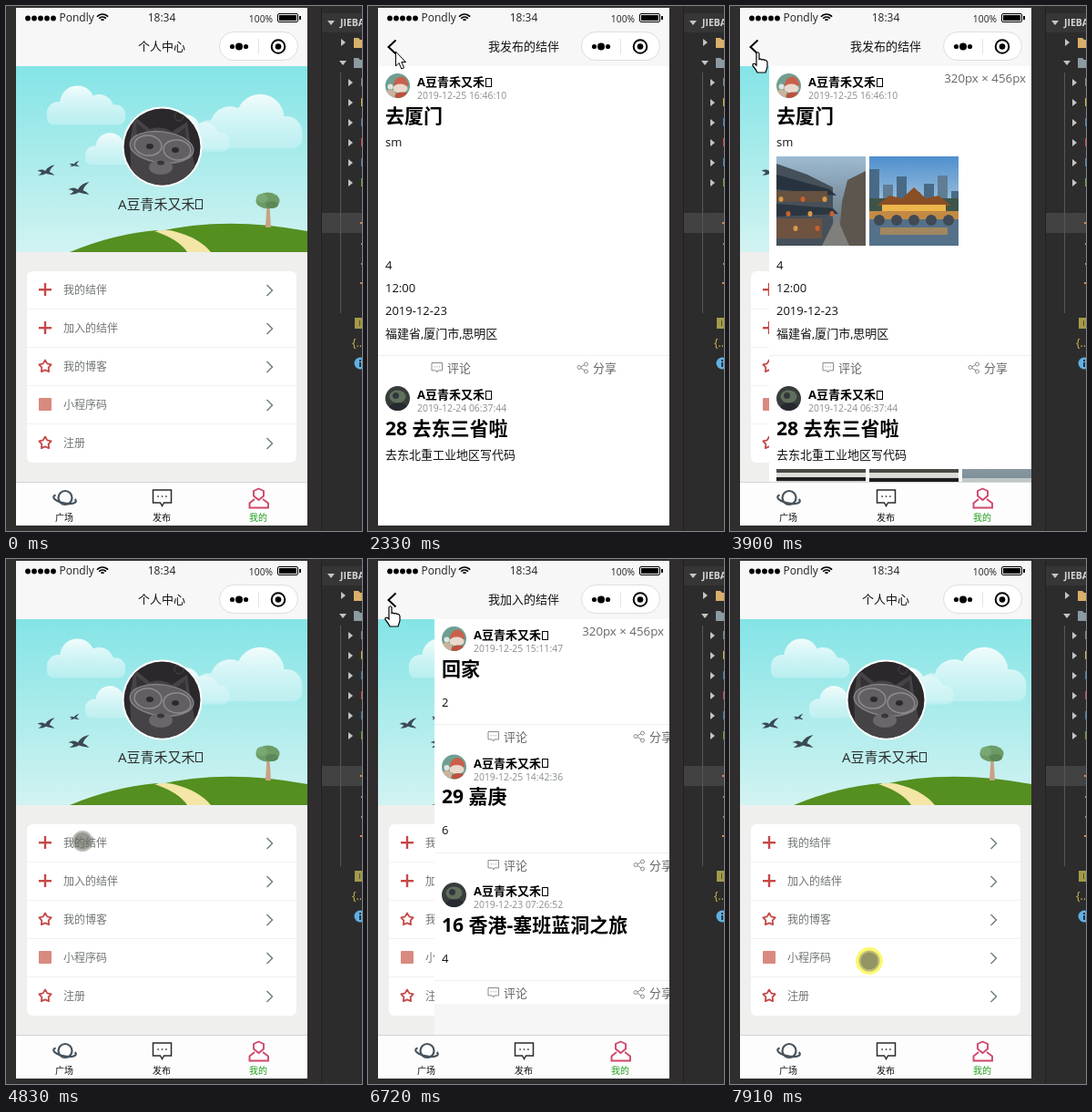
Recreate the animation shown at these times as an HTML page with a canvas. Size 391 px wide and 576 px high, loop 7990 ms.

```html
<!DOCTYPE html>
<html lang="zh">
<head>
<meta charset="utf-8">
<title>个人中心</title>
<style>
html, body { margin: 0; width: 100%; height: 100%; overflow: hidden; background: #2f2d2e; }
canvas { display: block; width: 391px; height: 576px; }
</style>
</head>
<body>
<canvas id="stage"></canvas>
<script>
const W = 391, H = 576, LOOP = 7990, L = 11, SLIDE = 300;
const FONT = '"Open Sans","Noto Sans","Noto Sans CJK SC","Noto Sans CJK",sans-serif';
const RED = '#c64848';
const canvas = document.getElementById('stage');
const c = canvas.getContext('2d');
const dpr = window.devicePixelRatio || 1;
canvas.width = W * dpr;
canvas.height = H * dpr;

// Two visits to a sub page: all times in ms
const VISITS = [
  { title: '我发布的结伴', open: 1400, slideIn: 1476, loaded: 2020, back: 3870, labels: [2330, 4790] },
  { title: '我加入的结伴', open: 5300, slideIn: 5658, loaded: 5950, back: 6675, labels: [6000, 7570] }
];
// Pointer path: time, x, y
const PATH = [
  [70, 311, 535], [710, 130, 321], [1300, 130, 321], [1500, 99, 241], [1930, 42, 86], [2090, 34, 68], [2170, 30, 50],
  [4440, 30, 50], [4910, 95, 362], [5300, 95, 362], [5790, 48, 98], [6010, 30, 67], [6159, 30, 67], [6160, 24, 51],
  [6960, 24, 51], [7190, 190, 250], [7350, 190, 250], [7600, 165, 486], [7750, 153, 441], [7990, 153, 441]
];
const CLICKS = [[1170, 1320], [3580, 3740], [5150, 5300], [6470, 6620], [7910, 7990]];

const within = (t, a, b) => t >= a && t < b;
const clamp = v => Math.max(0, Math.min(1, v));

// CSS "ease" timing curve
function ease(x) {
  if (x <= 0) return 0;
  if (x >= 1) return 1;
  const bez = (u, a, b) => 3 * u * (1 - u) * (1 - u) * a + 3 * u * u * (1 - u) * b + u * u * u;
  let lo = 0, hi = 1;
  for (let i = 0; i < 20; i++) {
    const m = (lo + hi) / 2;
    if (bez(m, .25, .25) < x) lo = m; else hi = m;
  }
  return bez(lo, .1, 1);
}

function text(s, x, y, size, color, align = 'left', weight = 400) {
  c.font = `${weight} ${size}px ${FONT}`;
  c.fillStyle = color;
  c.textAlign = align;
  c.fillText(s, x, y + size * .37);
}
function rect(x, y, w, h, color) { c.fillStyle = color; c.fillRect(x, y, w, h); }
function round(x, y, w, h, r, fill, stroke) {
  c.beginPath();
  c.roundRect(x, y, w, h, r);
  if (fill) { c.fillStyle = fill; c.fill(); }
  if (stroke) { c.strokeStyle = stroke; c.lineWidth = 1; c.stroke(); }
}
function oval(x, y, rx, ry, color, rot = 0) {
  c.beginPath();
  c.ellipse(x, y, rx, ry, rot, 0, 7);
  c.fillStyle = color;
  c.fill();
}
const disc = (x, y, r, color) => oval(x, y, r, r, color);
function arc(x, y, rx, ry, rot, from, to, color, width) {
  c.beginPath();
  c.ellipse(x, y, rx, ry, rot, from, to);
  c.strokeStyle = color;
  c.lineWidth = width;
  c.stroke();
}
const ring = (x, y, r, color, width) => arc(x, y, r, r, 0, 0, 7, color, width);
function line(pts, color, width = 1, close) {
  c.beginPath();
  pts.forEach(p => c.lineTo(p[0], p[1]));
  if (close) c.closePath();
  c.strokeStyle = color;
  c.lineWidth = width;
  c.stroke();
}
function shape(d, fill, stroke, width = 1) {
  const p = new Path2D(d);
  if (fill) { c.fillStyle = fill; c.fill(p); }
  if (stroke) { c.strokeStyle = stroke; c.lineWidth = width; c.stroke(p); }
}
function clipped(make, draw) {
  c.save();
  c.beginPath();
  make();
  c.clip();
  draw();
  c.restore();
}
function at(x, y, draw) {
  c.save();
  c.translate(x, y);
  draw();
  c.restore();
}
function shade(y0, y1, from, to) {
  const g = c.createLinearGradient(0, y0, 0, y1);
  g.addColorStop(0, from);
  g.addColorStop(1, to);
  return g;
}
function userName(x, y, size, color, weight) {
  const s = 'A豆青禾又禾';
  text(s, x, y, size, color, 'left', weight);
  const w = c.measureText(s).width;
  c.strokeStyle = color;
  c.lineWidth = 1;
  c.strokeRect(Math.round(x + w + 1) + .5, Math.round(y - size * .36) + .5, Math.round(size * .45), Math.round(size * .68));
}

function editor() {
  rect(0, 0, W, H, '#2f2d2e');
  rect(346, 0, 1, H, '#222122');
  rect(347, 0, 44, H, '#2c2c2d');
  rect(347, 8, 44, 21, '#363637');
  rect(347, 227, 44, 22, '#424243');
  const tip = (x, y, open) => shape(open ? `M${x - 4} ${y - 2}h8l-4 5z` : `M${x - 2} ${y - 4}v8l5-4z`, '#c4c4c4');
  tip(357, 18, true);
  text('JIEBAN', 367, 18, 10.5, '#d4d4d4', 'left', 700);
  tip(370, 40);
  tip(370, 62, true);
  shape('M382 35h5l2 2h4v9h-11z', '#d9b06a');
  shape('M382 57h5l2 2h4v9h-11z', '#8c9aa2');
  ['#7e8b91', '#d9b83c', '#3f86b8', '#d8484c', '#3f86b8', '#6ba83a'].forEach((col, i) => {
    tip(378, 84 + i * 22);
    rect(390, 79 + i * 22, 1, 9, col);
  });
  rect(367, 73, 1, 264, '#575757');
  rect(389, 237, 2, 2, '#e08a50');
  rect(390, 260, 1, 2, '#999');
  rect(390, 282, 1, 2, '#999');
  rect(389, 303, 2, 2, '#e08a50');
  rect(383, 342, 8, 12, '#a39a4c');
  rect(388, 345, 1, 6, '#55501f');
  text('{..}', 380, 370, 12, '#d8c04c');
  disc(389, 392, 6.5, '#62b0e2');
  rect(388, 391, 2, 5, '#234');
  rect(388, 388, 2, 2, '#234');
}

function navBar(title, back) {
  rect(L, 2, 320, 64, '#f7f7f7');
  for (let i = 0; i < 5; i++) disc(24 + i * 7, 13.5, 2.9, '#000');
  text('Pondly', 58.5, 13, 12, '#222');
  for (let i = 0; i < 3; i++) arc(106, 17, 2 + i * 3, 2 + i * 3, 0, -Math.PI * .77, -Math.PI * .23, '#000', 1.7);
  text('18:34', 171, 13, 12, '#222', 'center');
  text('100%', 293, 14, 10.3, '#222', 'right');
  round(298.5, 8.5, 22, 9, 1.5, null, '#000');
  rect(300, 10, 19, 6, '#000');
  rect(322, 11, 2, 4, '#000');
  text(title, 171, 44, 13, '#111', 'center');
  if (back) line([[30.5, 37.5], [22.5, 45], [30.5, 52.5]], '#000', 2);
  round(234.5, 28.5, 86, 31, 15.5, '#fff', '#dedede');
  disc(248.5, 44.5, 2.6, '#000');
  disc(256, 44.5, 4, '#000');
  disc(263.5, 44.5, 2.6, '#000');
  rect(277, 36, 1, 17, '#e4e4e4');
  ring(299, 44.5, 7.3, '#000', 2);
  disc(299, 44.5, 3.3, '#000');
}

function bird(x, y, s) {
  at(x, y, () => {
    c.scale(s, s);
    shape('M-10 1Q-5-2-1 1Q3-5 10-6Q5-2 4 2Q7 3 10 6Q3 5 0 4Q-3 6-9 6Q-6 4-5 3Q-7 1-10 1z', '#3b4a55');
  });
}
function cloud(x, y, s, flip = 1) {
  at(x, y, () => {
    c.scale(s * flip, s);
    c.fillStyle = shade(-32, 24, '#f2fcfc', 'rgba(205,243,245,.55)');
    c.beginPath();
    [[-38, 6, 16], [-12, -8, 24], [18, 0, 20], [40, 8, 14]].forEach(b => {
      c.moveTo(b[0] + b[2], b[1]);
      c.arc(b[0], b[1], b[2], 0, 7);
    });
    c.roundRect(-54, 2, 108, 20, 10);
    c.fill();
  });
}
function catPhoto() {
  disc(171.5, 154.5, 44, '#fff');
  clipped(() => c.arc(171.5, 154.5, 42, 0, 7), () => {
    rect(128, 110, 88, 90, '#2a282b');
    shape('M138 200L136 150L141 121L158 135Q171 131 182 138L199 127L203 156Q210 180 207 200z', '#454346');
    shape('M143 128L155 138L144 145zM197 133L187 141L198 150z', '#343235');
    oval(171, 155, 35, 17, 'rgba(140,138,141,.4)', .12);
    arc(156, 153, 15, 11, .12, 0, 7, '#8d8b8e', 1.5);
    arc(188, 158, 15, 11, .12, 0, 7, '#8d8b8e', 1.5);
    arc(171, 155, 35, 17, .12, 0, 7, '#858386', 1.5);
    oval(158, 154, 4, 3, '#2c2a2d');
    oval(186, 158, 4, 3, '#2c2a2d');
    oval(170, 177, 13, 8, '#69676a');
    oval(170, 172, 4, 2.5, '#38363a');
    ring(190, 121, 5, '#464447', 1);
  });
}
function banner() {
  clipped(() => c.rect(L, 66, 320, 204), () => {
    rect(L, 66, 320, 204, shade(66, 270, '#84e4e6', '#d2f3f1'));
    cloud(88, 113, .8);
    cloud(122, 160, .65);
    cloud(205, 143, .75);
    cloud(266, 132, 1.1, -1);
    bird(44, 180, .95);
    bird(75, 173, .55);
    bird(80, 200, 1.15);
    shape('M70 270Q118 250 166 246L200 270z', '#548f20');
    shape('M165 248Q240 230 331 247V270H165z', '#548f20');
    shape('M163 247Q178 245 184 247Q212 254 225 270H199Q190 256 163 247z', '#f3e6a6');
    shape('M285 243L286.500 219H289.500L291 243z', '#c9a184');
    oval(287.5, 213.5, 13, 9, '#6c9b66');
    oval(281, 211, 6, 5, '#7aa872');
    oval(292, 218, 7, 4, '#5c8857');
  });
  catPhoto();
  userName(123, 217, 15, '#2b2b2b', 400);
}

function star(x, y, r) {
  const pts = [];
  for (let i = 0; i < 10; i++) {
    const a = -Math.PI / 2 + i * Math.PI / 5, d = i % 2 ? r * .55 : r;
    pts.push([x + d * Math.cos(a), y + d * Math.sin(a)]);
  }
  c.lineJoin = 'round';
  line(pts, RED, 1.8, true);
  c.lineJoin = 'miter';
}
function home() {
  rect(L, 66, 320, 456, '#efefee');
  rect(L, 522, 320, 48, '#fff');
  banner();
  round(23, 291, 296, 210, 6, '#fff');
  ['我的结伴', '加入的结伴', '我的博客', '小程序码', '注册'].forEach((s, i) => {
    const y = 312 + i * 42;
    if (i) rect(23, y - 22, 296, 1, '#f2f2f2');
    if (i < 2) {
      rect(36, y - 2, 14, 2.4, RED);
      rect(41.8, y - 8, 2.4, 14, RED);
    } else if (i === 3) round(36, y - 8, 14, 14, 1, '#d98a80');
    else star(43, y - .5, 7);
    text(s, 63, y, 12, '#717773');
    line([[286.5, y - 6], [292.5, y], [286.5, y + 6]], '#74827e', 1.5);
  });
}

function bubble(x, y, w, h, color, width) {
  at(x, y, () => {
    shape(`M0 0H${w}V${h * .8}H${w * .6}L${w * .5} ${h}L${w * .4} ${h * .8}H0z`, null, color, width);
    [.28, .5, .72].forEach(k => rect(w * k - width / 2, h * .36, width, width, color));
  });
}
function tabBar() {
  rect(L, 522, 320, 48, '#fdfdfd');
  rect(L, 522, 320, 1, '#d4d4d4');
  ring(65, 539.5, 7.5, '#46525c', 2.2);
  arc(64.5, 541, 12.5, 4.5, .2, -.5, 3.7, '#46525c', 2.2);
  bubble(161.5, 531, 20, 17.5, '#2b2b2b', 1.5);
  shape('M277.500 529.500L283 532V537.500L277.500 542L272 537.500V532zM273 541L267.500 545.500V550.500H288V545.500L282 541', null, '#d0486a', 1.9);
  text('广场', 64, 561, 10, '#111', 'center');
  text('发布', 171, 561, 10, '#111', 'center');
  text('我的', 277, 561, 10, '#1f9e1c', 'center');
}

// Pictures inside posts, each 98 by 98
const PHOTOS = [
  () => {
    rect(0, 0, 98, 98, shade(0, 98, '#9dbbd2', '#59636a'));
    shape('M0 8L34 20L62 34V98H0z', '#45505a');
    shape('M0 20L58 36L66 43L0 36z', '#27333e');
    shape('M0 52L62 57L68 63L0 66z', '#2b3640');
    rect(0, 38, 56, 12, '#66503f');
    rect(0, 68, 50, 22, '#6e5340');
    shape('M78 26L98 16V98H68L72 50z', '#5d564f');
    shape('M50 98L66 66L80 98z', '#7f807c');
    for (let i = 0; i < 8; i++) oval(5 + i * 8, 47 + i % 3 * 16, 2.5, 3, i % 2 ? '#c8602f' : '#d89a48');
  },
  () => {
    rect(0, 0, 98, 98, shade(0, 60, '#4f8fcf', '#a9c8dd'));
    for (let i = 0; i < 7; i++) rect(i * 15, 14 + i * 17 % 26, 11, 50, i % 2 ? '#5f7d95' : '#496a86');
    rect(0, 46, 98, 16, '#3d5549');
    rect(0, 68, 98, 30, '#55718a');
    shape('M8 54L22 43L36 46L49 34L62 46L76 43L90 54z', '#8a4f24');
    rect(14, 53, 70, 7, '#eeb54a');
    rect(0, 60, 98, 9, '#c28a43');
    for (let i = 0; i < 5; i++) disc(11 + i * 19, 70, 6, '#3f4a55');
    rect(12, 78, 74, 8, 'rgba(214,150,70,.6)');
  },
  () => keys(0),
  () => keys(1),
  () => {
    rect(0, 0, 98, 98, shade(0, 60, '#8797a0', '#5b6d77'));
    rect(0, 10, 98, 5, '#c0c7c8');
  }
];
function keys(i) {
  rect(0, 0, 98, 98, '#cbccc7');
  rect(0, 0, 98, 4, '#4a4845');
  rect(0, 4, 98, 5, '#dcdcd6');
  rect(0, 9 + i, 98, 4, '#1f1d1d');
  rect(0, 26, 98, 3, '#97958f');
  rect(0, 42, 98, 14, '#5f5b57');
}
const photo = (i, x, y, h = 98) => at(x, y, () => clipped(() => c.rect(0, 0, 98, h), PHOTOS[i]));

function face(x, y, dark) {
  clipped(() => c.arc(x, y, 13.5, 0, 7), () => at(x, y, () => {
    rect(-14, -14, 28, 28, dark ? '#383c3b' : '#6f9f92');
    if (dark) {
      oval(0, -2, 9, 7, '#606f5c');
      oval(1, 10, 10, 5, '#262a30');
      disc(-2, -3, 3.5, '#31373a');
    } else {
      shape('M-5 0Q-3-11 5-10Q11-8 12 0z', '#c9604c');
      oval(3, 3, 8, 5, '#ead9cc');
      oval(-8, 1, 3, 3, '#dfe6df');
      oval(-8, 9, 6, 5, '#c9b39c');
      oval(5, 11, 8, 4, '#b9523f');
    }
  }));
}
function head(y, title, time, dark) {
  face(32.5, y + 21.5, dark);
  userName(54, y + 17.5, 13, '#000', 700);
  text(time, 54, y + 32.5, 10.4, '#87908a');
  text(title, 19, y + 54, 21, '#000', 'left', 700);
}
function foot(y) {
  rect(L, y - 14, 320, 1, '#f0f0f0');
  bubble(70, y - 5.5, 11.5, 10.5, '#8a8a8a', 1);
  text('评论', 87, y, 13, '#666');
  line([[239, y - 4], [232.5, y - .5], [239, y + 3.5]], '#8a8a8a');
  [[239.5, -4], [232, -.5], [239.5, 4]].forEach(p => {
    disc(p[0], y + p[1], 2, '#fff');
    ring(p[0], y + p[1], 2, '#8a8a8a', 1);
  });
  text('分享', 247, y, 13, '#666');
}
function feedOne(t) {
  rect(L, 66, 320, 504, '#fff');
  head(66, '去厦门', '2019-12-25 16:46:10');
  ['sm', '4', '12:00', '2019-12-23', '福建省,厦门市,思明区'].forEach((s, i) => text(s, 19, i ? 259 + i * 25 : 149, 13, '#111'));
  if (t >= 2790) photo(0, 19, 165);
  if (t >= 3030) photo(1, 121, 165);
  foot(397);
  head(409, '28 去东三省啦', '2019-12-24 06:37:44', true);
  text('去东北重工业地区写代码', 19, 492, 13, '#111');
  if (t >= 3190) photo(2, 19, 508, t < 3270 ? 30 : 98);
  if (t >= 3580) photo(3, 121, 508);
  if (t >= 3740) photo(4, 223, 508);
}
function feedTwo() {
  rect(L, 66, 320, 422, '#fff');
  [['回家', '25 15:11:47', '2'], ['29 嘉庚', '25 14:42:36', '6'], ['16 香港-塞班蓝洞之旅', '23 07:26:52', '4']].forEach((p, i) => {
    const y = 66 + i * 140.5;
    head(y, p[0], '2019-12-' + p[1], i === 2);
    text(p[2], 19, y + 91, 13, '#111');
    foot(Math.round(y + 129));
  });
}

function toast(t) {
  round(129, 238, 84, 104, 5, 'rgba(17,17,17,.7)');
  const turn = Math.floor(t / 83);
  for (let i = 0; i < 12; i++) {
    at(171, 287, () => {
      c.rotate(i * Math.PI / 6);
      const k = ((i - turn) % 12 + 12) % 12;
      round(-1.4, -15.5, 2.8, 7.5, 1.4, `rgba(240,240,240,${.35 + k * .05})`);
    });
  }
  text('加载中', 171, 319, 11, '#f4f4f4', 'center');
}
function sizeLabel(h) {
  rect(227, 66, 104, 25, 'rgba(255,255,255,.82)');
  text(`320px × ${h}px`, 325, 79.5, 13.3, '#666', 'right');
}

function cursor(t) {
  if (t < PATH[0][0]) return;
  let i = 0;
  while (i < PATH.length - 2 && PATH[i + 1][0] <= t) i++;
  const [a, b] = [PATH[i], PATH[i + 1]];
  const k = clamp((t - a[0]) / (b[0] - a[0]));
  const x = a[1] + (b[1] - a[1]) * k, y = a[2] + (b[2] - a[2]) * k;
  if (CLICKS.some(s => within(t, s[0], s[1]))) disc(x, y, 15, 'rgba(250,248,80,.82)');
  if (y >= 66) {
    disc(x, y, 11.5, 'rgba(130,130,120,.5)');
    disc(x, y, 9.5, 'rgba(80,85,75,.38)');
    return;
  }
  at(x, y, () => {
    if (within(t, 2000, 3580)) shape('M.5 0V16L4 12.500L6.800 19L9.600 17.800L6.800 11.500H11.500z', '#fff', '#000');
    else shape('M-1 2Q.5-.5 2 2V8.500Q3.500 7.500 5 9Q6.500 8 8 9.500Q10.500 9 11 12V16.500Q10.500 19 9 23H0Q-1.500 19.500-5 15.500Q-5.500 12.500-2.500 13.500L-1 15z', '#fff', '#000', 1.2);
  });
}

function draw(t) {
  c.setTransform(dpr, 0, 0, dpr, 0, 0);
  editor();
  const n = VISITS.findIndex(v => within(t, v.open, v.back + SLIDE));
  const v = VISITS[n];
  clipped(() => c.rect(L, 2, 320, 568), () => {
    home();
    if (v) {
      const shift = 320 * (1 - ease((t - v.slideIn) / SLIDE) + ease((t - v.back) / SLIDE));
      at(Math.round(shift), 0, () => {
        rect(L, 66, 320, 504, '#f6f6f6');
        if (t >= v.loaded) n ? feedTwo() : feedOne(t);
      });
      if (t < v.loaded) toast(t);
    }
    if (!v || t >= v.back) tabBar();
    navBar(v ? v.title : '个人中心', !!v);
    VISITS.forEach(s => {
      if (within(t, s.open, s.labels[0])) sizeLabel(504);
      if (within(t, s.back, s.labels[1])) sizeLabel(456);
    });
  });
  cursor(t);
}

const start = performance.now();
function tick() {
  draw((performance.now() - start) % LOOP);
  requestAnimationFrame(tick);
}
tick();
</script>
</body>
</html>
```
